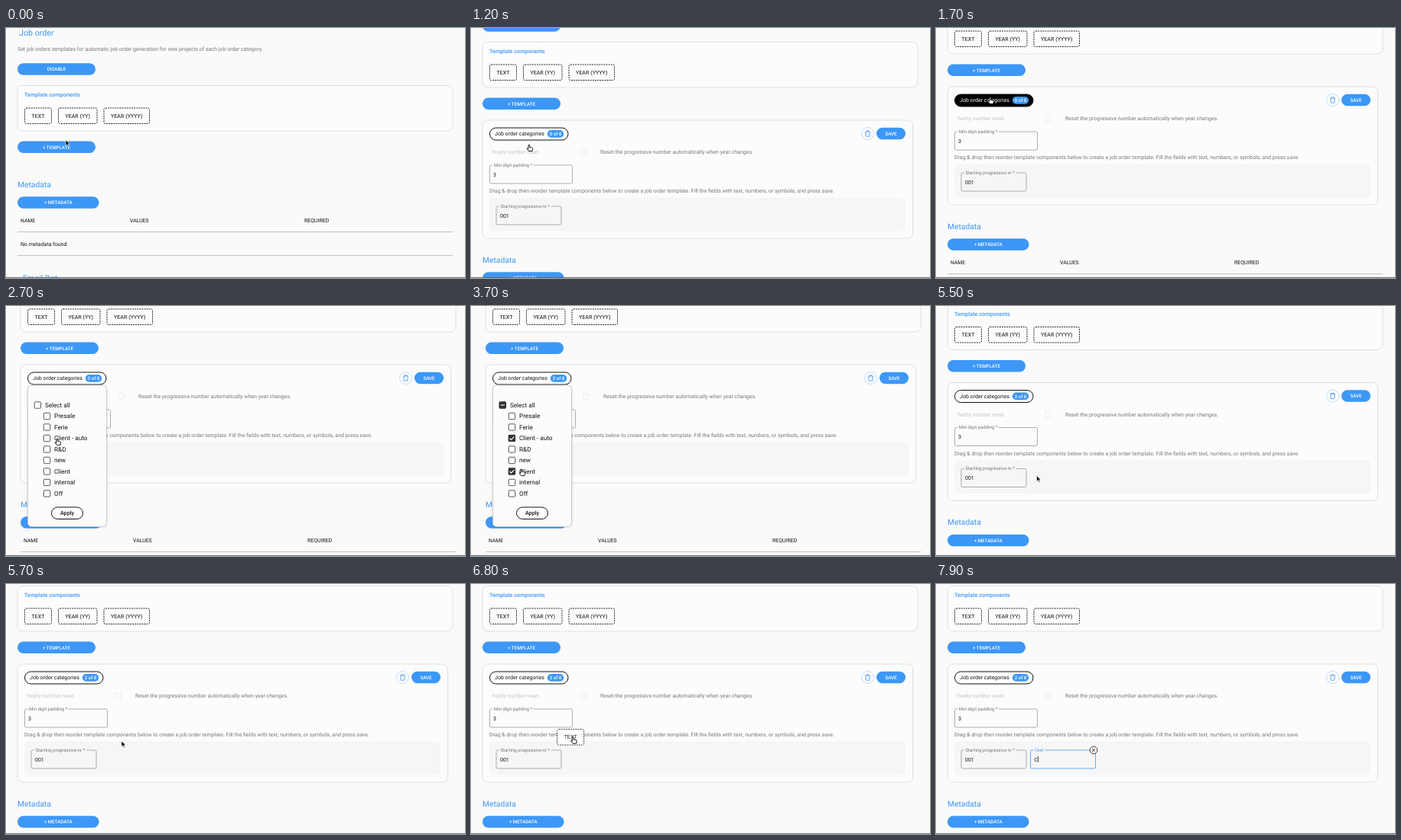
An HTML page that plays this animation: 600x328 px, repeating every 8 s.

```html
<!DOCTYPE html>
<html lang="en">
<head>
<meta charset="utf-8">
<title>Job order template</title>
<style>
  html, body { margin: 0; width: 600px; height: 328px; overflow: hidden; background: #fafafa; }
  svg { display: block; }
  text { font-family: Roboto, "Open Sans", sans-serif; text-rendering: geometricPrecision; white-space: pre; }
</style>
</head>
<body>
<svg id="stage" width="600" height="328" viewBox="0 0 600 328"></svg>
<script>
const BLUE = '#3c97f6', GREY = '#777', INK = '#111', PAPER = '#fcfcfc';
const LOOP = 8000, STEP = 100, CARD_HEIGHT = 156;

const text = (x, y, str, size = 7, fill = INK, extra = '') =>
  `<text x="${x}" y="${y}" font-size="${size}" fill="${fill}" ${extra}>${str}</text>`;
const label = (x, y, str, size, fill, extra = '') =>
  text(x, y, str, size, fill, `text-anchor="middle" font-weight="500" ${extra}`);
const box = (x, y, w, h, r, fill, stroke = 'none', extra = '') =>
  `<rect x="${x}" y="${y}" width="${w}" height="${h}" rx="${r}" fill="${fill}" stroke="${stroke}" ${extra}/>`;
const group = (id, content, extra = '') => `<g id="${id}" ${extra}>${content}</g>`;

const button = (x, y, w, str) =>
  box(x, y, w, 15.5, 7.75, BLUE) + label(x + w / 2, y + 9.9, str, 6.2, '#fff');
const chip = (x, y, w, str, fill = 'none') =>
  box(x, y, w, 20.5, 2, fill, INK, 'stroke-width=".9" stroke-dasharray="2 1.1"') +
  text(x + w / 2, y + 12.7, str, 7.1, INK, 'text-anchor="middle"');
const field = (x, y, w, name, nameWidth, back, stroke = '#999', ink = GREY) =>
  box(x, y, w, 24, 2, back, stroke, 'stroke-width=".8"') +
  box(x + 4, y - 2, nameWidth + 3, 4, 0, back) + text(x + 5.5, y + 1.7, name, 6, ink);
const rule = y => `<path d="M15 ${y}H584" stroke="#bbb" stroke-width=".9"/>`;

const header =
  text(17, 10, 'Job order', 10.7, BLUE) +
  text(15, 30.4, 'Set job orders templates for automatic job order generation for new projects of each job order category.', 7, GREY) +
  button(15, 46.3, 102, 'DISABLE') +
  box(15, 75.5, 569, 59.5, 7, PAPER, '#ddd', 'stroke-width=".9"') +
  text(24, 90.2, 'Template components', 7.25, BLUE, 'font-weight="500"') +
  chip(24.5, 105, 35, 'TEXT') + chip(68.5, 105, 50.5, 'YEAR (YY)') + chip(128, 105, 59.5, 'YEAR (YYYY)') +
  button(15, 148.6, 102, '+ TEMPLATE');

const trash = `<circle cx="518.5" cy="195.5" r="8" fill="#fdfdfd" stroke="#b5d3f3" stroke-width=".8"/>
  <path d="M515.2 193H521.8M517.2 193V191.8H519.8V193M515.8 193L516.1 199.2H520.9L521.2 193" fill="none" stroke="${BLUE}" stroke-width=".8"/>`;

const textField = field(123.5, 291, 85, 'Text', 12, '#f6f6f6', BLUE, BLUE) +
  group('typed', text(128.3, 305.6, 'C') + `<path d="M133.5 299V307" stroke="${INK}" stroke-width=".7"/>`) +
  `<circle cx="206" cy="291" r="4.8" fill="#fff" stroke="${INK}" stroke-width=".8"/>
   <path d="M204 289L208 293M208 289L204 293" stroke="${INK}" stroke-width=".7"/>`;

const card =
  box(15, 178, 562.5, 155, 7, PAPER, '#ddd', 'stroke-width=".9"') +
  box(24.5, 188, 102.5, 16, 8, '#fff', INK, 'id="pill"') +
  text(31, 198.4, 'Job order categories', 7.05, INK, 'id="pillText"') +
  box(99.8, 191, 21.4, 9.8, 4.9, BLUE) + label(110.5, 198.1, '0 of 8', 6.1, '#fff', 'id="count"') +
  trash + button(530, 187.8, 38, 'SAVE') +
  text(27, 222, 'Yearly number reset', 7, '#c4c4c4') +
  box(142.8, 216.2, 7, 7, 1, 'none', '#ececec') +
  text(169, 222, 'Reset the progressive number automatically when year changes.', 7, GREY) +
  field(24.5, 237, 108, 'Min digit padding *', 50, PAPER) + text(29, 251.6, '3') +
  text(24, 273, 'Drag &amp; drop then reorder template components below to create a job order template. Fill the fields with text, numbers, or symbols, and press save.', 7, GREY) +
  box(24, 279.5, 544, 44, 5, '#f6f6f6') +
  field(33, 291, 85, 'Starting progressive nr *', 65, '#f6f6f6') + text(38, 305.6, '001') +
  group('textField', textField);

const metadata =
  text(15, 208.6, 'Metadata', 10.3, BLUE) + button(15, 221.3, 106.5, '+ METADATA') +
  text(19, 254.6, 'NAME', 6.8) + text(162, 254.6, 'VALUES', 6.9) + text(390, 254.6, 'REQUIRED', 7) +
  rule(267.5) + text(19, 286, 'No metadata found') + rule(298.5) +
  text(22, 332, 'Email Bot', 10.7, BLUE);

const options = ['Presale', 'Ferie', 'Client - auto', 'R&amp;D', 'new', 'Client', 'internal', 'Off'];
const checkbox = (id, x, y, mark) =>
  box(x + .5, y - 4.2, 8.4, 8.4, 1, '#fff', '#444', 'stroke-width=".9"') +
  group(id, box(x, y - 4.6, 9.2, 9.2, 1, '#333') +
    `<path transform="translate(${x} ${y})" d="${mark}" fill="none" stroke="#fff" stroke-width="1.1"/>`);
const TICK = 'M1.8 0L3.8 2.1L7.6 -2.2';
const menu =
  box(28.5, 104.5, 103, 185, 5, '#000', 'none', 'opacity=".22" filter="url(#blur)"') +
  box(28.5, 104, 103, 185.5, 5, PAPER, '#c4c4c4', 'stroke-width=".8"') +
  checkbox('all', 36.7, 130, 'M2 0H7.2') + text(51, 132.8, 'Select all', 8.1) +
  options.map((name, i) => {
    const y = 144.5 + i * 14.5;
    return checkbox('option' + i, 48.8, y, TICK) + text(63, y + 2.8, name, 8.2);
  }).join('') +
  box(59.5, 264, 41, 15.5, 7.75, '#fff', INK, 'id="apply"') +
  label(80, 274.2, 'Apply', 7.2, INK, 'id="applyText"');

const pointers =
  group('arrow', '<path d="M0 0V7.4L1.8 5.8L3 8.6L4.3 8L3.1 5.3H5.4Z" fill="#000" stroke="#fff" stroke-width=".6"/>') +
  group('hand', `<path d="M-.9 .6Q0 -.6 .8 .6V3.3L3.6 4Q4.7 4.3 4.6 5.4L4 8.6H-.4L-2.8 5.5Q-3 4.4 -1.9 4.6L-.9 5.5Z"
    fill="#fff" stroke="#000" stroke-width=".9" stroke-linejoin="round"/>`) +
  group('beam', '<path d="M-1.6 -4H1.6M0 -4V4M-1.6 4H1.6" stroke="#222" stroke-width=".8" fill="none"/>');

document.getElementById('stage').innerHTML =
  '<defs><filter id="blur"><feGaussianBlur stdDeviation="1.6"/></filter></defs>' +
  group('page', header + group('card', card) + group('metadata', metadata)) +
  group('menu', menu) +
  group('ghost', chip(-21, -10, 35, 'TEXT', '#fff'), 'opacity=".85"') +
  group('pointer', pointers) +
  '<path d="M0 327.4H600" stroke="#666" stroke-width="1"/>';

const SCROLL = [[900, 0], [1200, 57], [1400, 87], [1600, 101], [5200, 101], [5400, 82], [5600, 73]];
const POINTER = [
  [0, 78, 147], [300, 77, 153], [1200, 76, 153], [1600, 71, 91], [1900, 70, 91], [2400, 67, 174],
  [2900, 67, 174], [3300, 66, 214], [3700, 66, 214], [4100, 76, 270], [5100, 76, 270],
  [5700, 151, 206], [5900, 144, 190], [6300, 45, 42], [6500, 45, 42], [6900, 150, 230], [7300, 160, 232]
];
const clamp = v => Math.max(0, Math.min(1, v));
const ease = p => p * p * (3 - 2 * p);

// Values of a keyed track at time t; each key is [time, ...values].
function track(keys, t, curve = p => p) {
  const next = keys.findIndex(k => k[0] > t);
  if (next < 0) return keys[keys.length - 1].slice(1);
  if (next === 0) return keys[0].slice(1);
  const a = keys[next - 1], b = keys[next];
  const p = curve((t - a[0]) / (b[0] - a[0]));
  return a.slice(1).map((v, i) => v + (b[i + 1] - v) * p);
}

const el = id => document.getElementById(id);
const set = (id, name, value) => el(id).setAttribute(name, value);
const move = (id, x, y) => set(id, 'transform', `translate(${x} ${y})`);
const show = (id, on) => set(id, 'display', on ? 'inline' : 'none');
const within = (t, from, to) => t >= from && t < to;

function invert(id, on) {
  set(id, 'fill', on ? '#000' : '#fff');
  set(id + 'Text', 'fill', on ? '#fff' : INK);
}

function render(t) {
  const added = t >= 400, menuOpen = within(t, 2000, 5200);
  const [scroll] = track(SCROLL, t);
  const [x, y] = track(POINTER, t, ease);
  move('page', within(t, 2000, 5100) ? 4 : 0, -scroll);

  show('card', added);
  set('card', 'opacity', clamp((t - 300) / 300));
  move('metadata', 0, added ? CARD_HEIGHT : 0);
  invert('pill', within(t, 1600, 2000));

  show('menu', menuOpen);
  set('menu', 'opacity', Math.min(clamp((t - 1900) / 200), clamp((5200 - t) / 200)));
  const first = t >= 2900, second = t >= 3600;
  options.forEach((_, i) => show('option' + i, (i === 2 && first) || (i === 5 && second)));
  show('all', first);
  el('count').textContent = `${first + second} of 8`;
  invert('apply', within(t, 4000, 5200));

  show('textField', t >= 6900);
  show('typed', t >= 7900);
  show('ghost', within(t, 6500, 6900));
  move('ghost', x, y);

  const beam = t >= 7200;
  const hand = within(t, 200, 5200) || within(t, 6200, 6900);
  show('pointer', t < 7900);
  move('pointer', x, y);
  show('beam', beam);
  show('hand', hand);
  show('arrow', !beam && !hand);
}

const start = performance.now();
function tick() {
  const t = (performance.now() - start) % LOOP;
  render(Math.floor(t / STEP) * STEP);
  requestAnimationFrame(tick);
}
tick();
</script>
</body>
</html>
```
